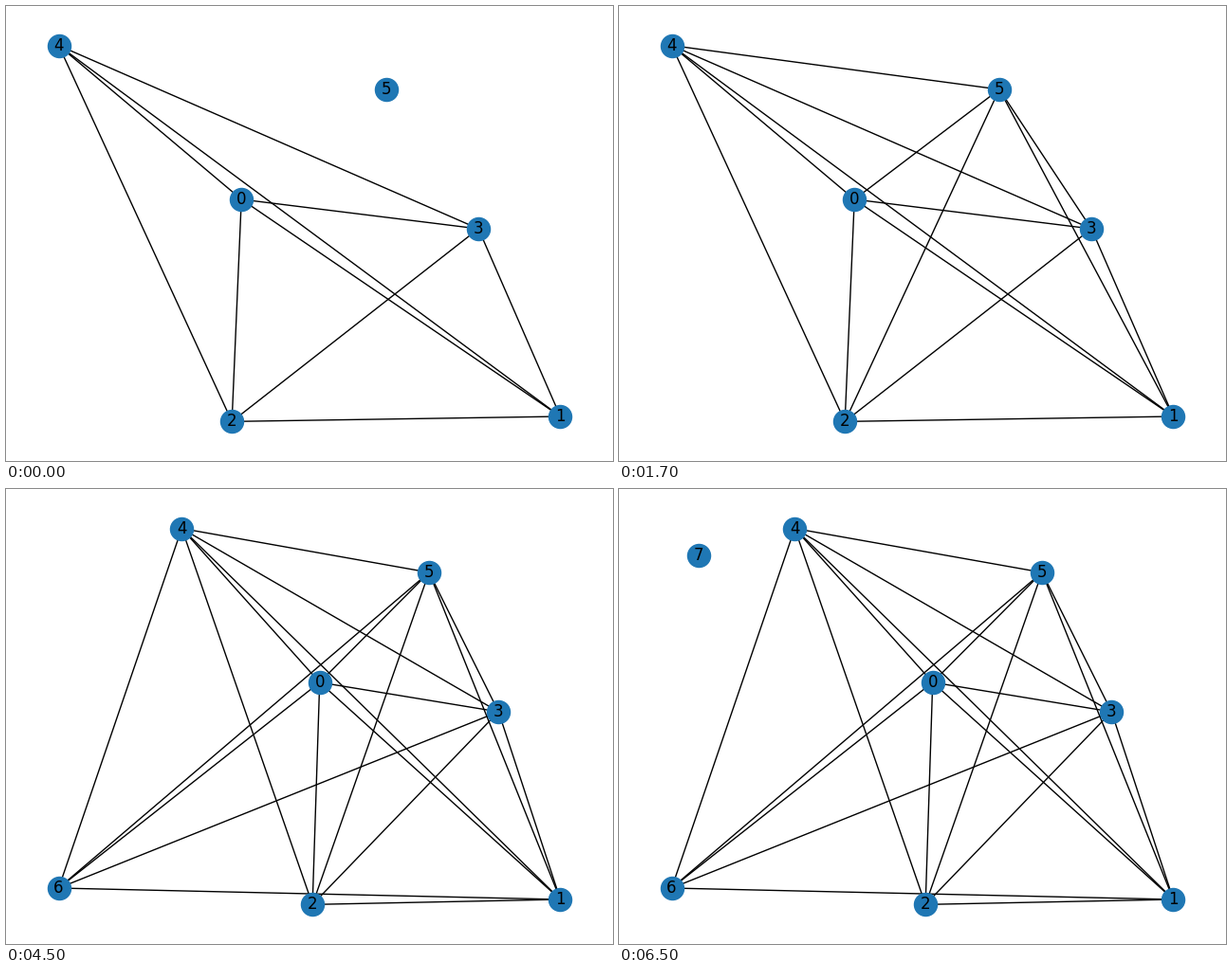
Animation, 640 px wide and 480 px high, one loop 8000 ms. Source, as a matplotlib script:

```python
from itertools import combinations

import matplotlib.pyplot as plt
from matplotlib.animation import FuncAnimation
from matplotlib.collections import LineCollection

WIDTH, HEIGHT, DPI = 640, 480, 100
STEP_MS, STEPS = 500, 16
MARGIN = 0.05

NODES = [(330.7, 204), (584.46, 433), (323.15, 438.35), (519.3, 235),
         (185.3, 41.65), (446, 88), (55.54, 421), (84, 70)]

EDGES_5 = list(combinations(range(5), 2))
EDGES_6 = list(combinations(range(6), 2))
EDGES_7 = EDGES_6 + [(n, 6) for n in (0, 1, 3, 4, 5)]


def pad(low, high):
    extra = MARGIN * (high - low)
    return low - extra, high + extra


def view_limits(edges, node_count):
    """Horizontal view: padded edge extent joined with the nodes, padded again."""
    ends = [NODES[n][0] for edge in edges for n in edge]
    low, high = pad(min(ends), max(ends))
    xs = [x for x, _ in NODES[:node_count]]
    return pad(min(low, *xs), max(high, *xs))


STAGES = [(6, EDGES_5), (6, EDGES_6), (7, EDGES_6), (7, EDGES_7), (8, EDGES_7)]

fig = plt.figure(figsize=(WIDTH / DPI, HEIGHT / DPI), dpi=DPI, facecolor="white")
ax = fig.add_axes((0, 0, 1, 1))


def draw(step):
    node_count, edges = STAGES[(step + 3) // 4]
    nodes = NODES[:node_count]
    ax.clear()
    ax.set_axis_off()
    segments = [(NODES[a], NODES[b]) for a, b in edges]
    ax.add_collection(LineCollection(segments, colors="black", linewidths=1, zorder=1))
    ax.scatter(*zip(*nodes), s=300, c="#1f77b4", zorder=2)
    for label, (x, y) in enumerate(nodes):
        ax.text(x, y, str(label), size=12, color="black", family="DejaVu Sans",
                ha="center", va="center", zorder=3)
    ax.set_xlim(view_limits(edges, node_count))
    ax.set_ylim(HEIGHT, 0)
    return []


anim = FuncAnimation(fig, draw, frames=STEPS, interval=STEP_MS,
                     init_func=lambda: draw(0), repeat=True, repeat_delay=0)
plt.show()
```
